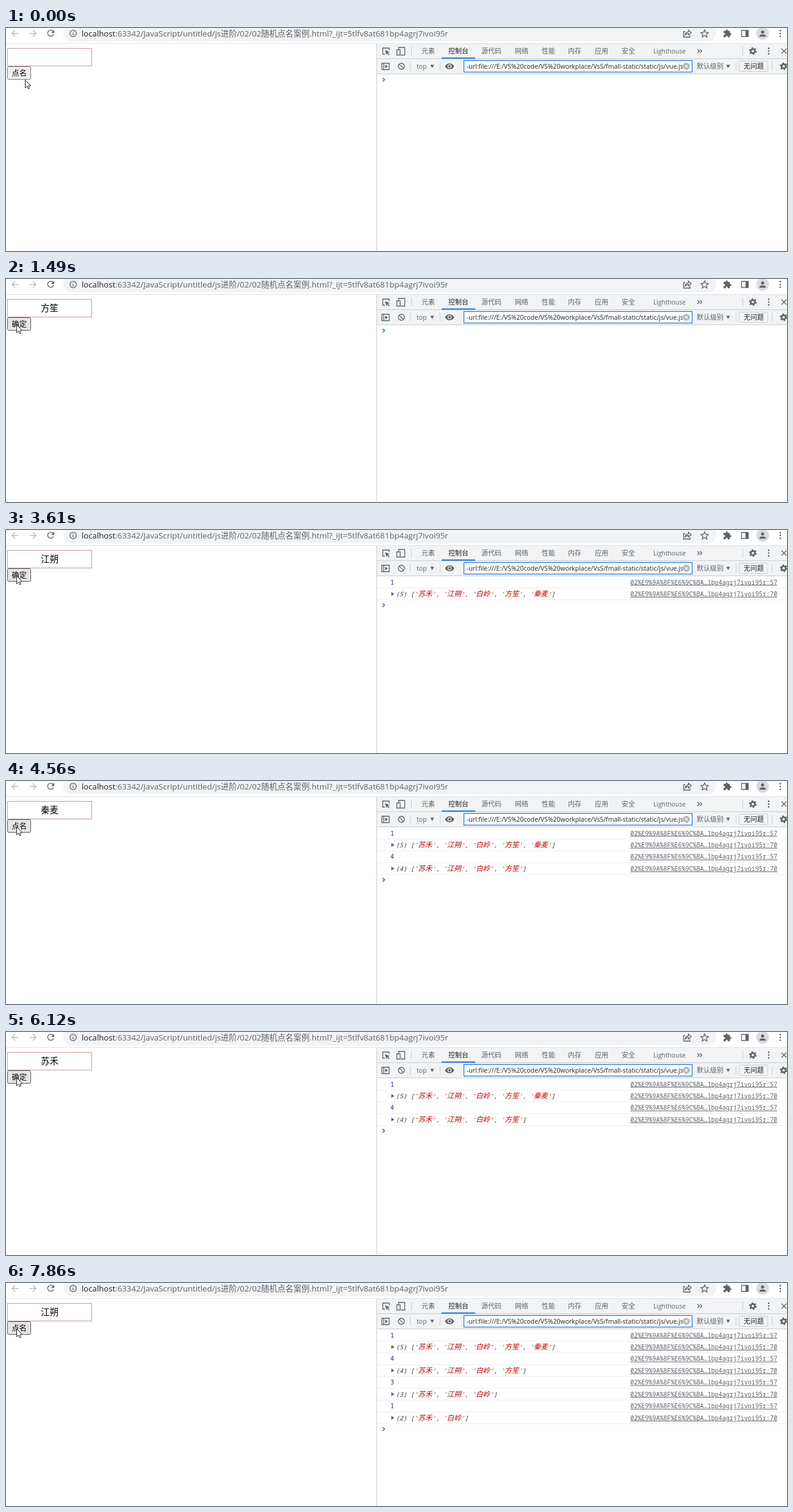
These frames come from a looping animation (1280x367 px, 8000 ms). An HTML page:

```html
<!DOCTYPE html>
<html lang="zh-CN">
<head>
<meta charset="utf-8">
<title>随机点名</title>
<style>
html, body { margin: 0; width: 100%; height: 100%; overflow: hidden; background: #fff; }
svg { display: block; }
text { font: 11px 'Open Sans', 'Noto Sans CJK SC', 'Noto Sans CJK', sans-serif; fill: #5f6368; white-space: pre; }
.url { font-size: 13.2px; }
.dark { fill: #202124; }
.page { fill: #000; text-anchor: middle; }
.log text { font: 10.04px 'Noto Sans Mono', 'Noto Sans CJK SC', 'Noto Sans CJK', monospace; }
.log .num { fill: #1a1aa6; }
.log .list { font-style: italic; fill: #303942; }
.log .link { text-anchor: end; text-decoration: underline; }
.str { fill: #c80000; }
.cjk { font-size: 11.65px; }
.line { fill: none; stroke: #5f6368; stroke-width: 1.3; }
.sep { stroke: #cacdd1; fill: none; }
.solid { fill: #5f6368; }
</style>
</head>
<body>
<svg width="1280" height="367" viewBox="0 0 1280 367">
  <defs>
    <g id="gear" class="line">
      <circle r="3.4" stroke-width="2.6"/>
      <circle r="5.3" stroke-width="2" stroke-dasharray="2.6 2.95"/>
    </g>
    <g id="dots" class="solid"><circle cy="-4.6" r="1.3"/><circle r="1.3"/><circle cy="4.6" r="1.3"/></g>
    <path id="drop" class="solid" d="M-3-2.5H3L0 3Z"/>
    <path id="back" d="M5.5 0H-5M0-5.2L-5.2 0 0 5.2" fill="none" stroke="#babcbe" stroke-width="1.4"/>
  </defs>

  <!-- browser bar -->
  <use href="#back" x="15" y="9"/>
  <use href="#back" transform="translate(44 9) scale(-1 1)"/>
  <path class="line" stroke-width="1.5" d="M77.3 5.6A5 5 0 1 0 78 10.3"/>
  <path class="solid" d="M79 3V8.2H73.8Z"/>
  <rect x="94" y="-5" width="1070" height="27" rx="13.5" fill="#f1f3f4"/>
  <circle class="line" cx="110" cy="9" r="5.3"/>
  <path class="line" d="M110 8.2V12M110 5.8V7.1"/>
  <text class="url" x="124" y="14"><tspan class="dark">localhost</tspan>:63342/JavaScript/untitled/js进阶/02/02随机点名案例.html?_ijt=5tlfv8at681bp4agrj7ivoi95r</text>
  <path class="line" stroke-width="1.1" d="M1113 6H1110.5V15H1121V12M1113 11.5C1113.5 8 1115.5 6.5 1118.5 6.3V3.5L1123 7.7 1118.5 11.6V9C1116 9 1114.3 9.8 1113 11.5Z"/>
  <path class="line" d="M1145 3L1146.8 7.1 1151.2 7.5 1147.9 10.4 1148.9 14.8 1145 12.5 1141.1 14.8 1142.1 10.4 1138.8 7.5 1143.2 7.1Z"/>
  <path class="solid" transform="translate(1174.7 1.6) scale(.62)" d="M20.5 11H19V7c0-1.1-.9-2-2-2h-4V3.5a2.5 2.5 0 0 0-5 0V5H4c-1.1 0-2 .9-2 2v3.8h1.5a2.7 2.7 0 0 1 0 5.4H2V20c0 1.1.9 2 2 2h3.8v-1.5a2.7 2.7 0 0 1 5.4 0V22H17c1.1 0 2-.9 2-2v-4h1.5a2.5 2.5 0 0 0 0-5z"/>
  <path class="line" stroke-width="1.6" d="M1205.5 4H1216.5V14H1205.5Z"/>
  <path class="solid" d="M1212 4H1217V14H1212Z"/>
  <circle cx="1240" cy="9" r="10.5" fill="#dadce0"/>
  <circle class="solid" cx="1240" cy="6.5" r="2.6"/>
  <path class="solid" d="M1234.8 14.2V13C1234.8 9.6 1245.2 9.6 1245.2 13V14.2Z"/>
  <use href="#dots" x="1269" y="9"/>
  <path d="M0 25.5H1280" stroke="#dfe1e5"/>

  <!-- web page -->
  <rect x="2.5" y="33.5" width="138" height="29" fill="#fff" stroke="#c79c96"/>
  <text class="page" id="name" x="71.5" y="53.4" style="font-size:14.6px"></text>
  <rect id="button" x="2.5" y="63.5" width="38" height="21" rx="2"/>
  <text class="page" id="label" x="21.8" y="79" style="font-size:12.2px"></text>

  <!-- developer tools -->
  <path d="M608 26H1280V75H608Z" fill="#f1f3f4"/>
  <path class="sep" d="M607.5 26V367M608 50.5H1280M608 75.5H1280M664.5 31V45M1207.5 31V45M662.5 56V70M711.5 56V70M1196.5 56V70M1255.5 56V70"/>
  <path class="line" d="M621 43H617.5V33H628V36.5"/>
  <path class="solid" d="M621 36.5L629 39.6 625.8 40.7 628.8 43.8 627.7 44.9 624.7 41.8 623.7 44.6Z"/>
  <path class="line" d="M643.5 35V32H653.5V44.5H647M640.5 36H646V44.5H640.5Z"/>
  <g id="tabs"></g>
  <path d="M714 48.5H769V50.5H714Z" fill="#1a73e8"/>
  <path class="line" d="M1133.3 35L1136.3 38 1133.3 41M1137.3 35L1140.3 38 1137.3 41"/>
  <use href="#gear" x="1224" y="38"/>
  <use href="#dots" x="1250" y="38"/>
  <path class="line" d="M1271 34L1279 42M1279 34L1271 42"/>

  <path class="line" d="M616 58H628V68.5H616ZM619 58V68.5"/>
  <path class="solid" d="M621.5 60.3V66.2L626 63.2Z"/>
  <path class="line" stroke-width="1.5" d="M644.4 59.4L651.6 66.6M653 63A5 5 0 1 1 643 63 5 5 0 0 1 653 63Z"/>
  <text x="673" y="67" style="font-size:10.6px">top</text>
  <use href="#drop" x="698.5" y="63"/>
  <path class="solid" d="M719.5 63C722.5 56.5 731.5 56.5 734.5 63 731.5 69.5 722.5 69.5 719.5 63Z"/>
  <circle cx="727" cy="63" r="2.7" fill="none" stroke="#f1f3f4" stroke-width="1.2"/>
  <rect x="750.5" y="53.5" width="374" height="19" fill="#fff" stroke="#1a73e8" stroke-width="1.2"/>
  <clipPath id="field"><path d="M752 54H1109V72H752Z"/></clipPath>
  <text class="dark" x="755" y="67.3" style="font-size:10.48px" clip-path="url(#field)">-url:file:///E:/VS%20code/VS%20workplace/VsS/fmall-static/static/js/vue.js</text>
  <circle cx="1115" cy="63" r="5.8" fill="#b4b7ba"/>
  <path d="M1112.8 60.8L1117.2 65.2M1117.2 60.8L1112.8 65.2" stroke="#fff" stroke-width="1.2"/>
  <text x="1132" y="67">默认级别</text>
  <use href="#drop" x="1183.5" y="63"/>
  <rect x="1201.5" y="54.5" width="47" height="17" rx="2" class="sep"/>
  <text class="dark" x="1209" y="67">无问题</text>
  <use href="#gear" x="1274.5" y="63"/>

  <g class="log" id="log"></g>
  <path id="prompt" d="M617.3 -3L620.5 0 617.3 3" fill="none" stroke="#1a73e8" stroke-width="1.5"/>
  <path id="cursor" d="M0 0V13L3.1 10.3 5 14.5 7 13.6 5.2 9.5H9.3Z" fill="#fff" stroke="#222" stroke-width="1" stroke-linejoin="round"/>
</svg>
<script>
const $ = id => document.getElementById(id);
const roster = ['苏禾', '叶舟', '江朔', '白岭', '方笙', '秦麦'];
const picks = [1, 4, 3, 1];
const rowHeight = 19.45;

const tabs = { 元素: 681, 控制台: 725, 源代码: 779, 网络: 834, 性能: 878, 内存: 921, 应用: 965, 安全: 1009, Lighthouse: 1061 };
$('tabs').innerHTML = Object.entries(tabs).map(([label, x]) =>
  `<text x="${x}" y="42" ${label === '控制台' ? 'class="dark"' : ''}
    ${label === 'Lighthouse' ? 'style="font-size:10.3px"' : ''}>${label}</text>`).join('');

function logRow(i, content, line) {
  return `<g transform="translate(0 ${i * rowHeight})">${content}
    <text class="link" x="1264" y="89.5">02%E9%9A%8F%E6%9C%BA…1bp4agrj7ivoi95r:${line}</text>
    <path d="M608 95.5H1280" stroke="#eceef0"/></g>`;
}

const quote = name => `<tspan class="str">'<tspan class="cjk">${name}</tspan>'</tspan>`;
const left = [...roster];
$('log').innerHTML = picks.map((pick, i) => {
  left.splice(pick, 1);
  const list = `(${left.length}) [${left.map(quote).join(', ')}]`;
  return logRow(2 * i, `<text class="num" x="630" y="89.5">${pick}</text>`, 57) +
    logRow(2 * i + 1, `<path class="solid" d="M631.5 82.5V89L636.5 85.7Z"/><text class="list" x="639" y="89.5">${list}</text>`, 70);
}).join('');
const rows = [...$('log').children];

// Each track lists [start time, value]; a value holds until the next one.
const tracks = {
  name: [[0, -1], [790, 2], [1020, 0], [1170, 5], [1400, 3], [1490, 4], [1730, 2], [1880, 0], [2130, 1],
    [3530, 3], [3610, 2], [4010, 4], [4240, 0], [4330, 3], [4560, 5],
    [5650, 3], [5740, 2], [5970, 4], [6120, 0], [6360, 4], [7160, 3], [7560, 2]],
  label: [[0, '点名'], [790, '确定'], [2200, '点名'], [3530, '确定'], [4560, '点名'],
    [5650, '确定'], [6360, '点名'], [7160, '确定'], [7860, '点名']],
  button: [[0, 'idle'], [320, 'hover'], [3290, 'down'], [3530, 'hover'], [5270, 'down'], [5420, 'hover'],
    [7780, 'down'], [7860, 'hover']],
  cursor: [[0, '31.5 85.5'], [80, '18.5 85.5'], [320, '13.5 79.5'], [480, '17.5 75.5']],
  rows: [[0, 0], [2200, 2], [4560, 4], [6360, 6], [7860, 8]]
};
const looks = { idle: ['#efefef', '#767676'], hover: ['#e5e5e5', '#555'], down: ['#f5f5f5', '#8d8d8d'] };
const at = (track, t) => tracks[track].findLast(([start]) => start <= t)[1];

function draw() {
  const t = performance.now() % 8000;
  const count = at('rows', t);
  const [fill, stroke] = looks[at('button', t)];
  $('name').textContent = roster[at('name', t)] ?? '';
  $('label').textContent = at('label', t);
  $('button').setAttribute('fill', fill);
  $('button').setAttribute('stroke', stroke);
  $('cursor').setAttribute('transform', `translate(${at('cursor', t)})`);
  $('prompt').setAttribute('transform', `translate(0 ${85 + count * 19.4})`);
  rows.forEach((row, i) => row.style.display = i < count ? '' : 'none');
  requestAnimationFrame(draw);
}
draw();
</script>
</body>
</html>
```
